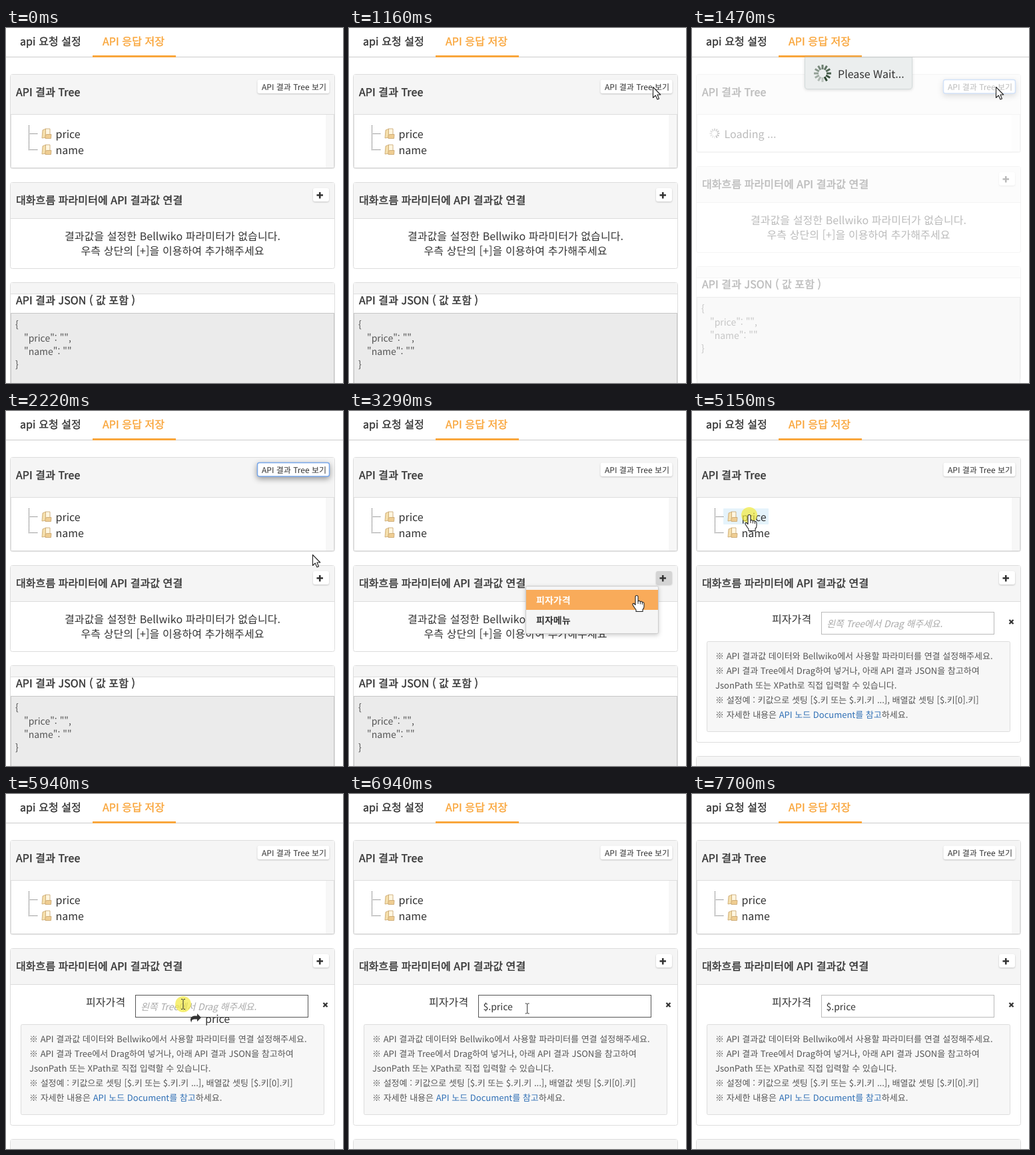
An HTML page for the animation above (8430 ms loop, 506x532 px).

```html
<!DOCTYPE html>
<html lang="ko">
<meta charset="utf-8">
<title>API 응답 저장</title>
<style>
html, body { margin: 0; width: 100%; height: 100%; overflow: hidden; background: #fff }
svg { display: block }
text { font: 16px "Noto Sans CJK KR", "Noto Sans KR", "Noto Sans", sans-serif; fill: #333; letter-spacing: .08px; text-rendering: geometricPrecision; white-space: pre }
.h { stroke: #333; stroke-width: .4px }
.on { fill: #f9a63c; stroke: #f9a63c }
.l { letter-spacing: 0 }
.s { font-size: 12px; letter-spacing: 0 }
.m { font-size: 14px; letter-spacing: 0 }
.code { fill: #555 }
.help { font-size: 13px; letter-spacing: 0; fill: #555 }
.hint { font-style: italic; fill: #aaa; letter-spacing: -.18px }
.b { font-weight: 700 }
.mid { text-anchor: middle }
.btn { fill: #fff; filter: drop-shadow(0 1px 1px #0003) }
.focus { stroke: #78a7ea; stroke-width: 1.5; filter: drop-shadow(0 3px 4px #0006) }
.open { fill: #d4d4d4 }
.cur { stroke: #222; stroke-width: 1.1; fill: #fff; stroke-linejoin: round }
</style>
<svg id="stage" width="506" height="532" viewBox="0 0 506 532"></svg>
<script>
const LOOP = 8430, STEP = 80;
const stage = document.getElementById('stage');

const text = (x, y, s, cls = '') => `<text x="${x}" y="${y}" class="${cls}">${s}</text>`;
const rect = (x, y, w, h, fill, stroke = 'none', extra = '') =>
  `<rect x="${x}" y="${y}" width="${w}" height="${h}" fill="${fill}" stroke="${stroke}" ${extra}/>`;
const group = (id, body) => `<g id="${id}">${body}</g>`;
const panel = (y, h, head, id) =>
  rect(6.5, y + .5, 487, h, '#fff', '#ddd', `rx="3" id="${id}"`) +
  rect(7, y + 1, 486, head, '#f5f5f5') + rect(7, y + head, 486, 1, '#ddd');
const spinner = (id, x, y, r0, r1, w, color) => {
  let spokes = '';
  for (let i = 0; i < 12; i++)
    spokes += `<path d="M0-${r0}V-${r1}" transform="rotate(${i * 30})" stroke="${color}" stroke-width="${w}" opacity="${(.25 + i * .068).toFixed(2)}"/>`;
  return `<g transform="translate(${x} ${y})">${group(id, spokes)}</g>`;
};
const leaf = (y, name) =>
  `<path d="M34 ${y}H48" stroke="#444" stroke-dasharray="1 1"/>
  <g transform="translate(53 ${y - 8.5})" stroke="#c7a26a" stroke-width=".8">
    <path d="M2 3L7 1V14L1 15Z" fill="#f5dfac"/><path d="M6.500 1H13V11H6.500Z" fill="#fff6e0"/>
    <path d="M6 11L8 9.500H15L14.500 15.500H6Z" fill="#efcd92"/></g>` + text(74.5, y + 6, name, 'l');

const help = [
  '※ API 결과값 데이터와 Bellwiko에서 사용할 파라미터를 연결 설정해주세요.',
  '※ API 결과 Tree에서 Drag하여 넣거나, 아래 API 결과 JSON을 참고하여',
  'JsonPath 또는 XPath로 직접 입력할 수 있습니다.',
  '※ 설정예 : 키값으로 셋팅 [$.키 또는 $.키.키 ...], 배열값 셋팅 [$.키[0].키]',
  '※ 자세한 내용은 <tspan fill="#2f6fb5">API 노드 Document를 참고</tspan>하세요.'
];
const json = ['{', '"price": "",', '"name": ""', '}'];

stage.innerHTML =
  rect(0, 43, 506, 1, '#ccc') + rect(130, 41, 125, 3, '#f9a63c') +
  text(21, 26, 'api 요청 설정', 'h') + text(145, 26, 'API 응답 저장', 'h on') +
  group('page',
    panel(69, 141, 60, 'box1') + text(15, 102, 'API 결과 Tree', 'h') +
    rect(480, 130, 13, 79, '#f7f7f7', 'none', 'id="strip"') +
    rect(7.5, 129.5, 485, 80, 'none', '#ddd', 'id="inner"') +
    rect(377.5, 77.5, 108, 20.5, '#fff', 'none', 'rx="3" class="btn" id="view"') +
    text(384, 92.5, 'API 결과 Tree 보기', 's') +
    group('tree',
      rect(47, 146, 68, 24, '#e5f3fb', 'none', 'id="row" rx="1"') +
      '<path d="M34.500 146V183" stroke="#444" stroke-dasharray="1 1"/>' +
      leaf(158.5, 'price') + leaf(182.5, 'name')) +
    group('loading', spinner('spin1', 34, 158, 4, 7.5, 1.6, '#333') + text(48.5, 164.5, 'Loading ...', 'l')) +
    group('low',
      panel(231, 129, 54, 'box2') + text(15, 264, '대화흐름 파라미터에 API 결과값 연결', 'h') +
      rect(461, 240, 24, 20, '#fff', 'none', 'rx="3" class="btn" id="add"') +
      '<path d="M466.500 250.500H476M471.250 246V255.500" stroke="#333" stroke-width="2.600"/>' +
      group('empty',
        text(250, 318, '결과값을 설정한 Bellwiko 파라미터가 없습니다.', 'mid') +
        text(250, 340, '우측 상단의 [+]을 이용하여 추가해주세요', 'mid')) +
      group('form',
        text(120, 318, '피자가격') +
        rect(194.5, 301.5, 259, 33, '#fff', '#bbb', 'id="field"') +
        text(202, 324, '왼쪽 Tree에서 Drag 해주세요.', 'm hint') + text(201.5, 324, '$.price', 'm') +
        '<path d="M476.500 313L482.500 319M482.500 313L476.500 319" stroke="#333" stroke-width="2.300"/>' +
        rect(22.5, 345.5, 455, 135, '#f7f7f7', '#ddd', 'rx="2"') +
        help.map((s, i) => text(35, 371.5 + i * 22, s, 'help')).join('')) +
      group('result',
        panel(381, 170, 17, 'box3') + text(15, 414, 'API 결과 JSON ( 값 포함 )', 'h') +
        rect(7.5, 427.5, 485, 130, '#ebebeb', '#c6c6c6') +
        json.map((s, i) => text(i % 3 ? 27 : 14, 450 + i * 20, s, 'm code')).join('')))) +
  group('menu',
    rect(265.5, 262.5, 199, 71, '#f5f5f5', '#ccc', 'rx="2" style="filter:drop-shadow(0 2px 3px #0003)"') +
    rect(266, 268, 198, 30, '#f9ab5a', 'none', 'id="pick"') +
    text(281, 288.5, '피자가격', 'm b') + text(281, 318.5, '피자메뉴', 'm b')) +
  group('wait',
    '<path d="M169.500 44V87Q169.500 91.500 174 91.500H326Q330.500 91.500 330.500 87V44Z" fill="#ebeeee" stroke="#d3dada" style="filter:drop-shadow(0 1px 2px #0002)"/>' +
    spinner('spin2', 196, 68, 6, 13, 3, '#2c4630') + text(219, 74.5, 'Please Wait...', 'l')) +
  group('ghost',
    '<path transform="translate(11 14)" fill="#333" d="M16 6L10 0V3.500H7C2 3.500 0 6 0 9C0 11 1 13 1.500 13.500C1.500 9.500 3 8.500 7 8.500H10V12Z"/>' +
    text(33, 28, 'price', 'l')) +
  '<circle id="press" r="12" fill="#f4ea3c" opacity=".7"/>' +
  group('arrow', '<path class="cur" d="M.5.5V16.500L4.300 13L7 19L9.500 18L7 12H11.800Z"/>') +
  group('hand', `<path class="cur" d="M-2 1.500Q-2-.5 0-.5T2 1.500V8Q4 6.500 5.300 8.700Q7.300 7.500 8.300 9.700Q11 9 11 12V16Q11 19 9 20.500V23.500H-1V21Q-4 17-6 13.500Q-6.500 11-4 11.500L-2 13.500Z"/>
    <path d="M2 8V12M5.300 9V12.500M8.300 10V13" stroke="#222"/>`) +
  group('beam', '<path d="M-3-7.500H-1L0-6.500L1-7.500H3M0-6.500V6.500M-3 7.500H-1L0 6.500L1 7.500H3" fill="none" stroke="#333"/>');

const $ = Object.fromEntries([...stage.querySelectorAll('[id]')].map(e => [e.id, e]));
const [hint, value] = $.form.querySelectorAll('.m');
const pickText = $.menu.querySelector('text');

// start, number of steps, target
const moves = [
  [440, 10, 456, 88], [1980, 4, 460, 215], [2300, 5, 473, 254],
  [3290, 1, 432, 277], [3370, 2, 400, 284], [4370, 7, 86, 156],
  [5300, 9, 266, 315], [6940, 10, 325, 545]
];
const presses = [[1240, 1310], [2680, 2840], [3840, 4000], [5150, 6240]];

const progress = (t, start, n) =>
  t < start ? 0 : Math.min(n, Math.floor((t - start) / STEP) + 1) / n;
const show = (el, on) => el.style.display = on ? '' : 'none';
const place = (el, x, y) => el.setAttribute('transform', `translate(${x} ${y})`);

function pointer(t) {
  let x = 506, y = 410;
  for (const [start, n, tx, ty] of moves) {
    const p = progress(t, start, n), e = p * p * (3 - 2 * p);
    x += (tx - x) * e;
    y += (ty - y) * e;
  }
  return [x, y];
}

function draw(t) {
  const within = (a, b) => t >= a && t < b;
  const [x, y] = pointer(t);
  const busy = progress(t, 1310, 3) - progress(t, 1980, 3);
  const loading = within(1390, 1820), menu = within(2840, 3920), added = t >= 4000;

  $.page.setAttribute('opacity', 1 - .67 * busy);
  $.wait.setAttribute('opacity', busy);
  const spin = `rotate(${Math.floor(t / STEP) * 30})`;
  $.spin1.setAttribute('transform', spin);
  $.spin2.setAttribute('transform', spin);
  show($.tree, !loading);
  show($.loading, loading);
  const shrink = loading ? 24 : 0;
  $.box1.setAttribute('height', 141 - shrink);
  $.strip.setAttribute('height', 79 - shrink);
  $.inner.setAttribute('height', 80 - shrink);
  place($.low, 0, -shrink);
  $.view.classList.toggle('focus', within(1240, 2680));

  show($.menu, menu);
  $.add.classList.toggle('open', within(2680, 3920));
  const picked = t >= 3290;
  show($.pick, picked);
  pickText.style.fill = picked ? '#fff' : '#333';

  show($.empty, !added);
  show($.form, added);
  $.box2.setAttribute('height', added ? 265 : 129);
  place($.result, 0, added ? 136 : 0);

  const overField = t > 5300 && x > 194 && x < 454 && y > 301 && y < 335;
  $.field.setAttribute('stroke', overField ? '#555' : '#bbb');
  show(hint, t < 6240);
  show(value, t >= 6240);

  const overRow = within(4370, 5300) && x > 47 && x < 115 && y > 146 && y < 170;
  show($.row, overRow);
  const hand = overRow || within(2540, 4000);
  show($.hand, hand);
  show($.beam, overField);
  show($.arrow, t >= 440 && !hand && !overField);
  show($.ghost, within(5300, 6240));
  show($.press, presses.some(p => within(...p)));
  for (const el of [$.hand, $.beam, $.arrow, $.ghost, $.press]) place(el, x, y);
}

const begin = performance.now();
function tick() {
  draw((performance.now() - begin) % LOOP);
  requestAnimationFrame(tick);
}
tick();
</script>
</html>
```
